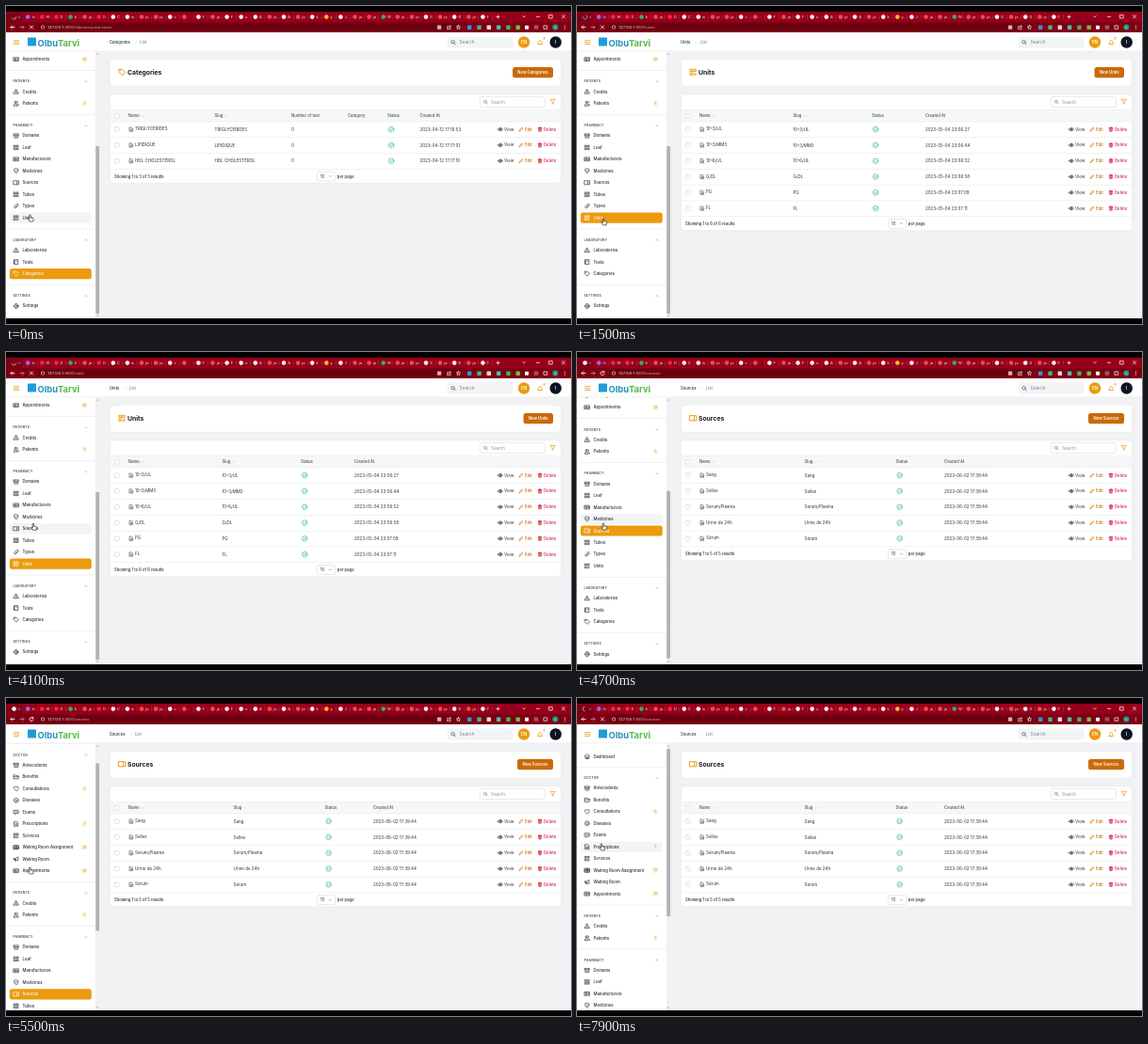
These frames come from a looping animation (600 by 338 pixels, 8000 ms). An HTML page with a canvas:

```html
<!DOCTYPE html>
<html lang="en">
<head>
<meta charset="utf-8">
<title>Clinic admin</title>
<style>
html, body { margin: 0; width: 100%; height: 100%; overflow: hidden; background: #000; }
canvas { display: block; width: 600px; height: 338px; }
</style>
</head>
<body>
<canvas id="stage"></canvas>
<script>
(() => {
const LOOP = 8000;
const canvas = document.getElementById('stage');
const ctx = canvas.getContext('2d');
const ratio = window.devicePixelRatio || 1;
canvas.width = 600 * ratio;
canvas.height = 338 * ratio;

const INK = '#272c36', GRAY = '#6b7280', LINE = '#e3e5e9';
const AMBER = '#ec9a0f', DEEP = '#c96a08', RED = '#d3213f', GREEN = '#2fc56b';
const UI = 'Inter, sans-serif', WEB = 'Roboto, sans-serif';

// Icons live in a 6 x 6 box centred on the origin.
const icons = {};
const shapes = {
  home: 'M-2.7 0L0-2.6L2.7 0M-1.9-.6V2.4H1.9V-.6M-.5 2.4V.6H.6V2.4',
  archive: 'M-2.5-2H2.5V-.6H-2.5ZM-2-.6V2.2H2V-.6M-.7.6H.7',
  folder: 'M-2.4-2H-.4L.3-1.2H2.4V2H-2.4ZM-2.4-.2H2.4',
  heart: 'M0 2.3L-2.4-.1C-3.3-2.3-.8-3 0-1.2C.8-3 3.3-2.3 2.4-.1Z',
  face: 'M2.4 0A2.4 2.4 0 1 1-2.4 0A2.4 2.4 0 1 1 2.4 0M-1 .7Q0 1.7 1 .7M-.9-.7V-.5M.9-.7V-.5',
  chat: 'M-2.4-2H2.4V1.3H.2L-1.2 2.5V1.3H-2.4ZM-1.2-.3H1.2',
  doc: 'M-1.9-2.5H.6L1.9-1.2V2.5H-1.9ZM-.9 0H.9M-.9 1.2H.9',
  grid: 'M-2.3-2.3H-.6V-.6H-2.3ZM.6-2.3H2.3V-.6H.6ZM-2.3.6H-.6V2.3H-2.3ZM.6.6H2.3V2.3H.6Z',
  qr: 'M-2.3-2.3H-.6V-.6H-2.3ZM.6-2.3H2.3V-.6H.6ZM-2.3.6H-.6V2.3H-2.3ZM.5.7H1.3M1.4 1.6H2.5M.6 2.4H1.3',
  table: 'M-2.6-2H2.6V2H-2.6ZM-2.6-.6H2.6M-2.6.7H2.6M-.8-2V2M.9-2V2',
  horn: 'M-2.4-.8H-.6L2-2.3V1.7L-.6.4H-2.4ZM-1.5.4L-1 2.3H-.3L-.6.4',
  card: 'M-2.6-1.9H2.6V1.9H-2.6ZM-1.7.8H0M-1.5-.8H-.5V0H-1.5ZM.8-.6H1.8M.8.5H1.8',
  warn: 'M0-2.4L2.6 2.1H-2.6ZM0-.8V.6M0 1.2V1.4',
  people: 'M-1.7-1.2A1.1 1.1 0 1 1 .5-1.2A1.1 1.1 0 1 1-1.7-1.2M-2.7 2.3Q-2.4.5-.6.5Q1.2.5 1.4 2.3ZM1.3-2.2Q2.5-1.2 1.3-.2M1.8.7Q2.6 1.2 2.7 2.3',
  shield: 'M0-2.5L2.2-1.7Q2.3 1.5 0 2.6Q-2.3 1.5-2.2-1.7ZM-.9 0L-.2.7L1-.6',
  ticket: 'M-2.7-2H2.7V2H-2.7ZM.9-1.2V-.6M.9-.2V.4M.9.8V1.4',
  clip: 'M1.9-.6L-.4 1.8Q-1.4 2.5-2 1.6Q-2.3.9-1.6.2L.8-2.1Q1.6-2.6 2.2-1.9Q2.5-1.3 2-.8L-.4 1.1',
  book: 'M-1.9-2.4H2V2.4H-1.9ZM-2.5-1.2H-1.4M-2.5 0H-1.4M-2.5 1.2H-1.4M0-1H1.2',
  tag: 'M-2.4-2.4H.1L2.6.1L.1 2.6L-2.4.1ZM-1.3-1.4V-1.2',
  gear: 'M2.2 0A2.2 2.2 0 1 1-2.2 0A2.2 2.2 0 1 1 2.2 0M.8 0A.8.8 0 1 1-.8 0A.8.8 0 1 1 .8 0M0-2.8V-2.2M0 2.2V2.8M-2.8 0H-2.2M2.2 0H2.8',
  bell: 'M-2.3 1.3Q-1.6.7-1.6-.6Q-1.5-2.4 0-2.4Q1.5-2.4 1.6-.6Q1.6.7 2.3 1.3ZM-.7 1.5Q0 3.1.7 1.5',
  funnel: 'M-2.6-2.4H2.6L.7 0V1.6L-.7 2.5V0Z',
  lens: 'M1.2-.4A1.7 1.7 0 1 1-2.2-.4A1.7 1.7 0 1 1 1.2-.4M.8.8L2.3 2.3',
  menu: 'M-2.6-2H2.4M-2.6 0H.6M-2.6 2H2.4M2.6-1L1.5 0L2.6 1',
  check: 'M2.7 0A2.7 2.7 0 1 1-2.7 0A2.7 2.7 0 1 1 2.7 0M-1.2 0L-.3.9L1.2-.8',
  eye: 'M-2.5 0Q0-3.2 2.5 0Q0 3.2-2.5 0ZM.8 0A.8.8 0 1 1-.8 0A.8.8 0 1 1 .8 0',
  pencil: 'M-1.9 1.9L-1.6.7L1.2-2.1L2-1.3L-.8 1.6Z',
  bin: 'M-1.6-1.3L-1.3 2.2H1.3L1.6-1.3ZM-2-1.5H2M-.6-2.1H.6M-.4-.4V1.3M.4-.4V1.3',
  down: 'M-1.2-.6L0 .6L1.2-.6',
  up: 'M-1.2.6L0-.6L1.2.6',
  left: 'M2 0H-2M-.3-1.7L-2 0L-.3 1.7',
  right: 'M-2 0H2M.3-1.7L2 0L.3 1.7',
  close: 'M-1.6-1.6L1.6 1.6M1.6-1.6L-1.6 1.6',
  plus: 'M-1.6 0H1.6M0-1.6V1.6',
  reload: 'M1.5-1.2A2 2 0 1 0 2 .4M1.8-2.2V-.9H.5',
  star: 'M0-2.2L.6-.7L2.2-.6L1 .5L1.4 2.1L0 1.2L-1.4 2.1L-1-.5L-2.2-.6L-.6-.7Z',
  share: 'M-.4-1H-1.9V2.1H1.6V.8M-.6.8Q-.4-1.1 1.9-1.1M.9-2.1L2-1.1L.9-.1',
  box: 'M-1.7-1.7H1.7V1.7H-1.7Z',
  line: 'M-1.7 0H1.7',
  hand: 'M-.8.2Q0-.6.7.2V3L3.6 3.8Q4.4 4.2 4.1 5.4L3.4 7.8H-.3L-2.3 5Q-2 3.9-.8 4.7Z'
};
for (const key in shapes) icons[key] = new Path2D(shapes[key]);

function icon(key, x, y, color, width = 0.65, scale = 1, fill) {
  ctx.save();
  ctx.translate(x, y);
  ctx.scale(scale, scale);
  if (fill) { ctx.fillStyle = fill; ctx.fill(icons[key]); }
  ctx.strokeStyle = color;
  ctx.lineWidth = width;
  ctx.stroke(icons[key]);
  ctx.restore();
}

function text(str, x, y, size, color, weight = 400, align = 'left', font = UI, spacing = 0) {
  ctx.font = `${weight} ${size}px ${font}`;
  ctx.letterSpacing = spacing + 'px';
  ctx.textAlign = align;
  ctx.fillStyle = color;
  ctx.fillText(str, x, y + size * 0.36);
  return ctx.measureText(str).width;
}

function rect(x, y, w, h, color) {
  ctx.fillStyle = color;
  ctx.fillRect(x, y, w, h);
}

function round(x, y, w, h, r, fill, stroke) {
  ctx.beginPath();
  ctx.roundRect(x, y, w, h, r);
  if (fill) { ctx.fillStyle = fill; ctx.fill(); }
  if (stroke) { ctx.strokeStyle = stroke; ctx.lineWidth = 0.6; ctx.stroke(); }
}

function dot(x, y, r, color) {
  ctx.beginPath();
  ctx.arc(x, y, r, 0, 7);
  ctx.fillStyle = color;
  ctx.fill();
}

// Sidebar: [label, icon, badge]
const groups = [
  ['DOCTOR', ['Antecedents', 'archive'], ['Benefits', 'folder'], ['Consultations', 'heart', '1'],
    ['Diseases', 'face'], ['Exams', 'chat'], ['Prescriptions', 'doc', '1'], ['Services', 'qr'],
    ['Waiting Room Assignment', 'table', '12'], ['Waiting Room', 'horn'], ['Appointments', 'card', '12']],
  ['PATIENTS', ['Credits', 'warn'], ['Patients', 'people', '1']],
  ['PHARMACY', ['Domains', 'archive'], ['Leaf', 'grid'], ['Manufacturers', 'card'], ['Medicines', 'shield'],
    ['Sources', 'ticket'], ['Tubes', 'grid'], ['Types', 'clip'], ['Units', 'qr']],
  ['LABORATORY', ['Laboratories', 'warn'], ['Tests', 'book'], ['Categories', 'tag']],
  ['SETTINGS', ['Settings', 'gear']]
];
const STEP = 12.47;
const items = [{ label: 'Dashboard', icon: 'home', y: 62 }];
const heads = [];
let headY = 85;
for (const [title, ...list] of groups) {
  heads.push({ title, y: headY });
  list.forEach(([label, icon, badge], i) => items.push({ label, icon, badge, y: headY + 10.9 + i * STEP }));
  headY += 10.9 + (list.length - 1) * STEP + 23.5;
}

const pages = {
  Categories: {
    icon: 'tag', url: 'laboratory-test-cates', button: 43, slug: 221.5, status: 405, created: 439.5,
    extra: [['Number of test', 303, '0'], ['Category', 363, '']],
    rows: [['TRIGLYCÉRIDES', '2023-04-12 17:16:53'], ['LIPIDIQUE', '2023-04-12 17:17:01'],
      ['HDL CHOLESTÉROL', '2023-04-12 17:17:10']]
  },
  Units: {
    icon: 'qr', url: 'units', button: 31.5, slug: 229.5, status: 313, created: 370, extra: [],
    rows: [['10^3/UL', '06:27'], ['10^3/MM3', '06:44'], ['10^6/UL', '06:52'], ['G/DL', '06:58'],
      ['PG', '07:09'], ['FL', '07:11']].map(([n, s]) => [n, '2023-05-04 23:' + s])
  },
  Sources: {
    icon: 'ticket', url: 'sources', button: 38, slug: 241.5, status: 338.5, created: 390, extra: [],
    rows: ['Sang', 'Selles', 'Serum/Plasma', 'Urine de 24h', 'Sérum'].map(n => [n, '2023-06-02 17:39:44'])
  }
};

const path = [[0, 25.5, 222], [400, 25.5, 222], [900, 28, 225.5], [1700, 28, 226], [1900, 28, 220],
  [2300, 29, 206.5], [2700, 28.5, 206], [3100, 28, 185], [3600, 28, 184], [4100, 29, 182.3], [4500, 28, 182],
  [5100, 28, 182], [5500, 25.5, 180], [6000, 26, 167], [6200, 26, 167], [6400, 26, 155], [8000, 26, 155]];

function cursorAt(t) {
  const i = path.findIndex(k => k[0] > t);
  const [a, b] = [path[i - 1], path[i]];
  let p = (t - a[0]) / (b[0] - a[0]);
  p = p * p * (3 - 2 * p);
  return [a[1] + (b[1] - a[1]) * p, a[2] + (b[2] - a[2]) * p];
}

function scrollAt(t) {
  if (t < 4500) return 151.5;
  const p = Math.min(1, Math.max(0, (t - 5120) / 680));
  return 149.3 * (1 - p) ** 2.2;
}

const pageAt = t => t < 1250 ? 'Categories' : t < 4500 ? 'Units' : 'Sources';
const loadingAt = t => t < 1800 || (t >= 2900 && t < 4600) || t >= 6750;

const tabColors = { p: '#8b6cf0', r: '#ff2338', g: '#28b463', l: '#e8504a', w: '#f6eef0', y: '#f4b92e' };
const tabs = ('pIn rW rD gk lja rD wC ww lja lja wc l: wF lja wF wu wA lja wA lja wk yy wJ lja lja gW ' +
  'lja lja wS lja wD lja wF').split(' ');

function drawBrowser(t, page) {
  rect(0, 6, 600, 11.5, '#97001b');
  rect(0, 17, 600, 11, '#7f0015');
  round(0, 7, 17, 11, [2, 2, 0, 0], '#7f0015');
  const busy = loadingAt(t);
  if (busy) {
    const committed = t > 1250 && t < 1800 || t > 4500 && t < 4600;
    const turn = committed ? t / 130 : -t / 220;
    ctx.beginPath();
    ctx.arc(8.5, 11.6, 2.4, turn, turn + (committed ? 4.2 : 2.6));
    ctx.strokeStyle = committed ? '#7fa8f5' : '#c9b4c0';
    ctx.lineWidth = 0.8;
    ctx.stroke();
  } else {
    dot(8.5, 11.6, 2.4, '#f3ecee');
  }
  icon('close', 14, 11.8, '#e6c6cc', 0.6, 0.6);
  tabs.forEach((tab, i) => {
    const x = 23.2 + i * 15.1;
    dot(x, 11.6, 2.3, tabColors[tab[0]]);
    text(tab.slice(1), x + 4.2, 11.7, 4.3, '#f5dfe3', 400, 'left', WEB);
    rect(x + 10, 9.5, 0.4, 4.5, '#b8505f');
  });
  icon('plus', 522.5, 11.5, '#fff', 0.7);
  icon('down', 550, 11.3, '#fff', 0.7);
  icon('line', 565, 11.3, '#fff', 0.7);
  icon('box', 578.5, 11.3, '#fff', 0.7);
  icon('close', 592, 11.3, '#fff', 0.7);

  icon('left', 7, 22.5, '#fff', 0.8);
  icon('right', 17, 22.5, '#c58d96', 0.8);
  icon(busy ? 'close' : 'reload', 27, 22.5, '#fff', 0.8);
  round(34, 18.6, 450, 8, 4, '#6c0011');
  dot(39, 22.6, 2, '#e9d2d6');
  dot(39, 22.6, 1.3, '#6c0011');
  const w = text('127.0.0.1', 44, 22.7, 4.2, '#fff', 400, 'left', WEB);
  text(':8000/' + page.url, 44 + w, 22.7, 4.2, '#d3a3ab', 400, 'left', WEB);
  round(458, 20.6, 4.2, 4.2, 0.5, '#d9b0b8');
  icon('share', 470.5, 22.6, '#fff', 0.6);
  icon('star', 480.5, 22.6, '#fff', 0.6);
  ['#3d8fe0', '#41b883', '#e9d8dc', '#44c2b8', '#3fb55f', '#6fbf44'].forEach((c, i) =>
    round(490 + i * 10.3, 20.5, 4.4, 4.4, 0.7, c));
  round(551, 20.7, 4, 4, 0.6, '#fff');
  icon('menu', 563, 22.6, '#fff', 0.6, 0.75);
  icon('box', 573, 22.6, '#fff', 0.7);
  dot(583.3, 22.6, 3, '#199c8b');
  text('v', 583.3, 22.4, 3.6, '#fff', 400, 'center', WEB);
  for (let i = -1; i < 2; i++) dot(593.5, 22.6 + i * 1.7, 0.5, '#fff');
}

function drawSidebar(t, active, scroll, pointer) {
  rect(0, 28, 100, 304, '#fff');
  ctx.save();
  ctx.beginPath();
  ctx.rect(0, 48, 100, 284);
  ctx.clip();
  ctx.translate(0, -scroll);
  const still = t < 5100 || t > 5800;
  for (const it of items) {
    const on = it.label === active;
    const over = still && Math.abs(pointer[1] + scroll - it.y) < STEP / 2;
    if (on || over) round(3.8, it.y - 5.6, 87, 11.2, 2.5, on ? AMBER : '#f4f4f5');
    const color = on ? '#fff' : INK;
    icon(it.icon, 10.8, it.y, color, 0.65);
    text(it.label, 17.5, it.y, 4.3, color, 500);
    if (it.badge) {
      const w = it.badge.length > 1 ? 6.6 : 5;
      round(83.3 - w / 2, it.y - 2.9, w, 5.8, 1.6, '#fdf0d9');
      text(it.badge, 83.3, it.y, 3.3, '#d18a1c', 500, 'center');
    }
  }
  for (const h of heads) {
    rect(0, h.y - 11.9, 95, 0.5, LINE);
    text(h.title, 7.5, h.y, 3.3, '#565d69', 700, 'left', UI, 0.2);
    icon('up', 85, h.y, GRAY, 0.6, 0.8);
  }
  ctx.restore();
  rect(94.8, 48, 4.8, 284, '#f1f1f1');
  rect(95.3, 54 + scroll * 0.627, 3.8, 178, '#b3b3b3');
  icon('up', 97.2, 51, '#6a6a6a', 0.8, 0.7);
  icon('down', 97.2, 329, '#6a6a6a', 0.8, 0.7);
}

function drawHeader(title) {
  rect(0, 28, 600, 20, '#fff');
  rect(0, 47.7, 600, 0.5, LINE);
  icon('menu', 11, 38.6, AMBER, 0.8);
  round(23, 33.5, 9, 9, 0.5, '#1f9cd8');
  const w = text('Olbu', 33.5, 39.2, 9.4, '#2291b8', 700);
  text('Tarvi', 33.5 + w, 39.2, 9.4, '#55b948', 700);
  const crumb = text(title, 110, 38.6, 4.2, INK, 500);
  text('/', 110 + crumb + 5.5, 38.6, 4.2, '#c7cbd2');
  text('List', 110 + crumb + 10.5, 38.6, 4.2, GRAY);
  round(468.5, 32.5, 70, 12, 3, '#f3f4f6');
  icon('lens', 475, 38.6, '#596070', 0.8);
  text('Search', 481.5, 38.6, 4.9, '#7d8490');
  dot(550, 38.5, 6.2, AMBER);
  text('EN', 550, 38.5, 4.5, '#fff', 600, 'center');
  icon('bell', 567.2, 39, AMBER, 0.75);
  dot(571.5, 34.6, 1.7, '#fbe3b8');
  text('0', 571.5, 34.6, 2.4, DEEP, 400, 'center');
  dot(583.7, 38.5, 6.2, '#0d1424');
  text('I', 583.7, 38.5, 4.5, '#fff', 600, 'center');
}

function checkbox(y) {
  round(115.5, y - 2.3, 4.6, 4.6, 1.1, '#fff', '#cfd3d9');
}

function drawPage(title, page) {
  rect(100, 48, 500, 284, '#f1f2f4');
  rect(99.7, 28, 0.5, 304, LINE);
  round(110.3, 56.3, 479.4, 29, 4, '#fff', LINE);
  icon(page.icon, 123.3, 70.3, AMBER, 0.75, 1.3);
  text(title, 129, 70.2, 6.8, '#15181f', 700);
  round(581 - page.button, 65, page.button, 11.2, 2.5, DEEP);
  text('New ' + title, 581 - page.button / 2, 70.7, 4.2, '#fff', 600, 'center');

  const n = page.rows.length, first = 122.7, pitch = 16.8;
  const end = first + n * pitch;
  round(110.3, 93.8, 479.4, end + 15.2 - 93.8, 4, '#fff', LINE);
  round(503.3, 96.3, 69, 11.4, 2.5, '#fff', '#d5d8de');
  icon('lens', 509.3, 102, GRAY, 0.65, 0.9);
  text('Search', 515, 102.1, 4.5, '#8a909b');
  icon('funnel', 580.8, 101.8, AMBER, 0.7);

  rect(110.6, 110.6, 478.8, 12.1, '#f6f7f8');
  rect(110.6, 110.3, 478.8, 0.5, LINE);
  checkbox(116.8);
  const columns = [['Name', 130], ['Slug', page.slug], ...page.extra, ['Status', page.status], ['Created At', page.created]];
  columns.forEach(([label, x], i) => {
    const w = text(label, x, 116.9, 4.2, '#4a515e', 500);
    if (i < 2) icon('down', x + w + 3.4, 117, '#a3a9b3', 0.55, 0.75);
  });

  page.rows.forEach(([label, created], i) => {
    const y = first + 8.4 + i * pitch;
    rect(110.6, first + i * pitch, 478.8, 0.5, LINE);
    checkbox(y);
    icon('doc', 133, y, INK, 0.6, 0.85);
    text(label, 137, y - 0.5, 4.5, INK);
    text(label, page.slug, y, 4.5, INK);
    for (const [, x, value] of page.extra) text(value, x, y, 4.5, INK);
    icon('check', page.status + 4.2, y, GREEN, 0.75);
    text(created, page.created, y, 4.5, INK);
    icon('eye', 525, y, INK, 0.75);
    text('View', 529, y, 4.4, '#4b5260', 500);
    icon('pencil', 547, y, DEEP, 0.7, 0.95);
    text('Edit', 551, y, 4.3, DEEP, 500);
    icon('bin', 567, y, RED, 0.75, 0.95);
    text('Delete', 571, y, 4.3, RED, 500);
  });

  rect(110.6, end, 478.8, 0.5, LINE);
  const y = end + 8;
  text(`Showing 1 to ${n} of ${n} results`, 115, y, 4.2, INK, 500);
  round(330.3, y - 5, 19.6, 10, 2.2, '#fff', '#d5d8de');
  text('10', 333.8, y, 4.4, INK);
  icon('down', 344.3, y, GRAY, 0.65, 0.85);
  text('per page', 351.8, y, 4.2, INK, 500);
}

function draw() {
  const t = performance.now() % LOOP;
  const title = pageAt(t), page = pages[title], pointer = cursorAt(t);
  ctx.setTransform(ratio, 0, 0, ratio, 0, 0);
  ctx.lineJoin = ctx.lineCap = 'round';
  rect(0, 0, 600, 338, '#000');
  drawBrowser(t, page);
  drawPage(title, page);
  drawSidebar(t, title, scrollAt(t), pointer);
  drawHeader(title);
  icon('hand', pointer[0], pointer[1], '#111', 0.7, 0.9, '#fff');
  requestAnimationFrame(draw);
}
draw();
})();
</script>
</body>
</html>
```
